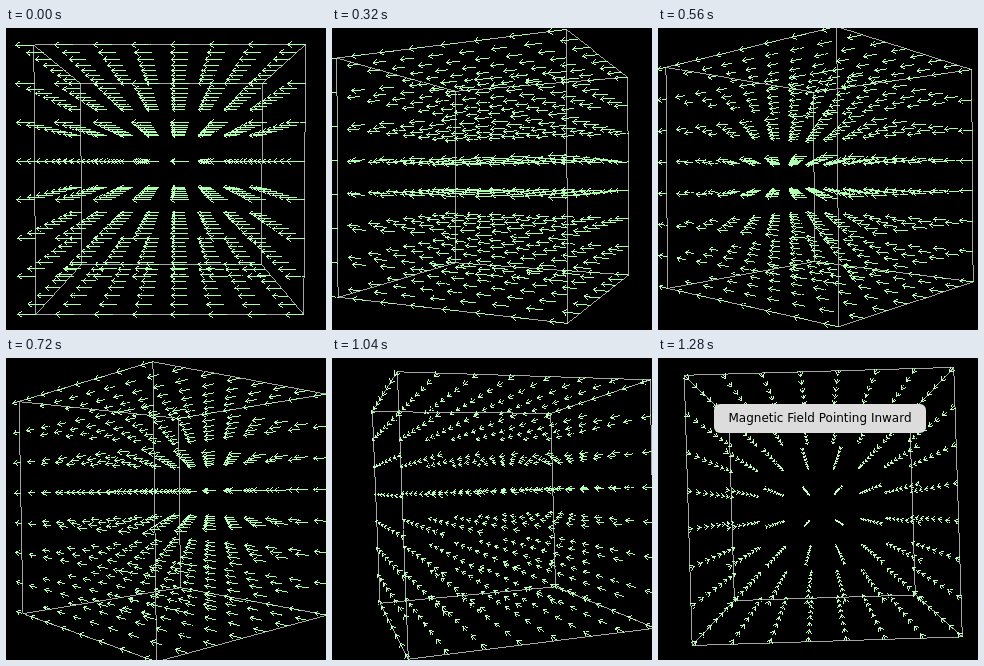
An HTML page with a canvas that plays this animation: 320 by 302 pixels, repeating every 1360 ms.

```html
<!DOCTYPE html>
<html lang="en">
<head>
<meta charset="utf-8">
<title>Magnetic field</title>
<style>
  html, body { margin: 0; width: 100%; height: 100%; overflow: hidden; background: #000; }
  #stage { position: relative; width: 320px; height: 302px; overflow: hidden; }
  canvas { display: block; }
  #label {
    position: absolute; left: 56px; top: 46px; width: 212px; height: 29px;
    border-radius: 6px; background: #dcdcdc; color: #000;
    font: 12px/29px "DejaVu Sans", sans-serif; text-align: center; white-space: nowrap;
    visibility: hidden;
  }
</style>
</head>
<body>
<div id="stage">
  <canvas id="view" width="320" height="302"></canvas>
  <div id="label">Magnetic Field Pointing Inward</div>
</div>
<script>
const ctx = document.getElementById('view').getContext('2d');
const label = document.getElementById('label');

const LOOP = 1360, STEP = 80, LABEL_AT = 1280;
const CX = 164.6, CY = 148.8, FOCAL = 548, DIST = 2.53;
const GRID = 8, ARROW = 0.067;
const BOX = '#a4a4a4', SHAFT = '#a6ffa6', HEAD = '#c0ffc0';

// time in ms, then yaw, pitch and roll in degrees
const poses = [
  [0, 0.5, 1.6, 0],
  [160, 13.5, 0, 0],
  [320, 25.2, 0, 0.3],
  [560, 40.9, 0, 0.4],
  [720, 49.3, 1.6, 0.65],
  [1040, 72.5, 2.3, 1.8],
  [1280, 89.7, -0.3, 1.75]
];

function poseAt(t) {
  let i = 0;
  while (i < poses.length - 2 && t > poses[i + 1][0]) i++;
  const a = poses[i], b = poses[i + 1];
  const k = (t - a[0]) / (b[0] - a[0]);
  return [1, 2, 3].map(j => (a[j] + (b[j] - a[j]) * k) * Math.PI / 180);
}

function camera([yaw, pitch, roll]) {
  const cy = Math.cos(yaw), sy = Math.sin(yaw);
  const cp = Math.cos(pitch), sp = Math.sin(pitch);
  const cr = Math.cos(roll), sr = Math.sin(roll);
  return (x, y, z) => {
    const x1 = x * cy - z * sy, z1 = x * sy + z * cy;
    const y2 = y * cp - z1 * sp, z2 = y * sp + z1 * cp;
    const s = FOCAL / (DIST - z2);
    return [CX + s * (x1 * cr - y2 * sr), CY - s * (x1 * sr + y2 * cr), s];
  };
}

// one-pixel line without smoothing
function line(x0, y0, x1, y1, color) {
  ctx.fillStyle = color;
  const n = Math.max(1, Math.round(Math.max(Math.abs(x1 - x0), Math.abs(y1 - y0))));
  for (let i = 0; i <= n; i++) {
    const k = i / n;
    ctx.fillRect(Math.floor(x0 + (x1 - x0) * k), Math.floor(y0 + (y1 - y0) * k), 1, 1);
  }
}

function drawBox(project) {
  const corner = n => project((n & 1) - 0.5, (n >> 1 & 1) - 0.5, (n >> 2) - 0.5);
  for (let n = 0; n < 8; n++) {
    for (const bit of [1, 2, 4]) {
      if (n & bit) continue;
      const [ax, ay] = corner(n), [bx, by] = corner(n | bit);
      line(ax, ay, bx, by, BOX);
    }
  }
}

function drawArrow(project, x, y, z) {
  const [ax, ay] = project(x, y, z);
  const [bx, by, scale] = project(x - ARROW, y, z);
  const len = Math.hypot(bx - ax, by - ay) || 1e-6;
  const ux = (bx - ax) / len, uy = (by - ay) / len;
  // heads face the viewer and shrink on foreshortened arrows
  const h = Math.min(scale * ARROW * 0.22, len * 1.2), w = h * 0.7;
  const px = bx - ux * h, py = by - uy * h;
  line(ax, ay, bx, by, SHAFT);
  line(px - uy * w, py + ux * w, bx, by, HEAD);
  line(px + uy * w, py - ux * w, bx, by, HEAD);
}

function drawField(project) {
  const at = i => i / (GRID - 1) - 0.5;
  for (let i = 0; i < GRID; i++)
    for (let j = 0; j < GRID; j++)
      for (let k = 0; k < GRID; k++)
        drawArrow(project, at(i), at(j), at(k));
}

let shown = -1;
function tick() {
  const t = Math.floor(performance.now() % LOOP / STEP) * STEP;
  if (t !== shown) {
    shown = t;
    const project = camera(poseAt(t));
    ctx.fillStyle = '#000';
    ctx.fillRect(0, 0, 320, 302);
    drawBox(project);
    drawField(project);
    label.style.visibility = t >= LABEL_AT ? 'visible' : 'hidden';
  }
  requestAnimationFrame(tick);
}
tick();
</script>
</body>
</html>
```
